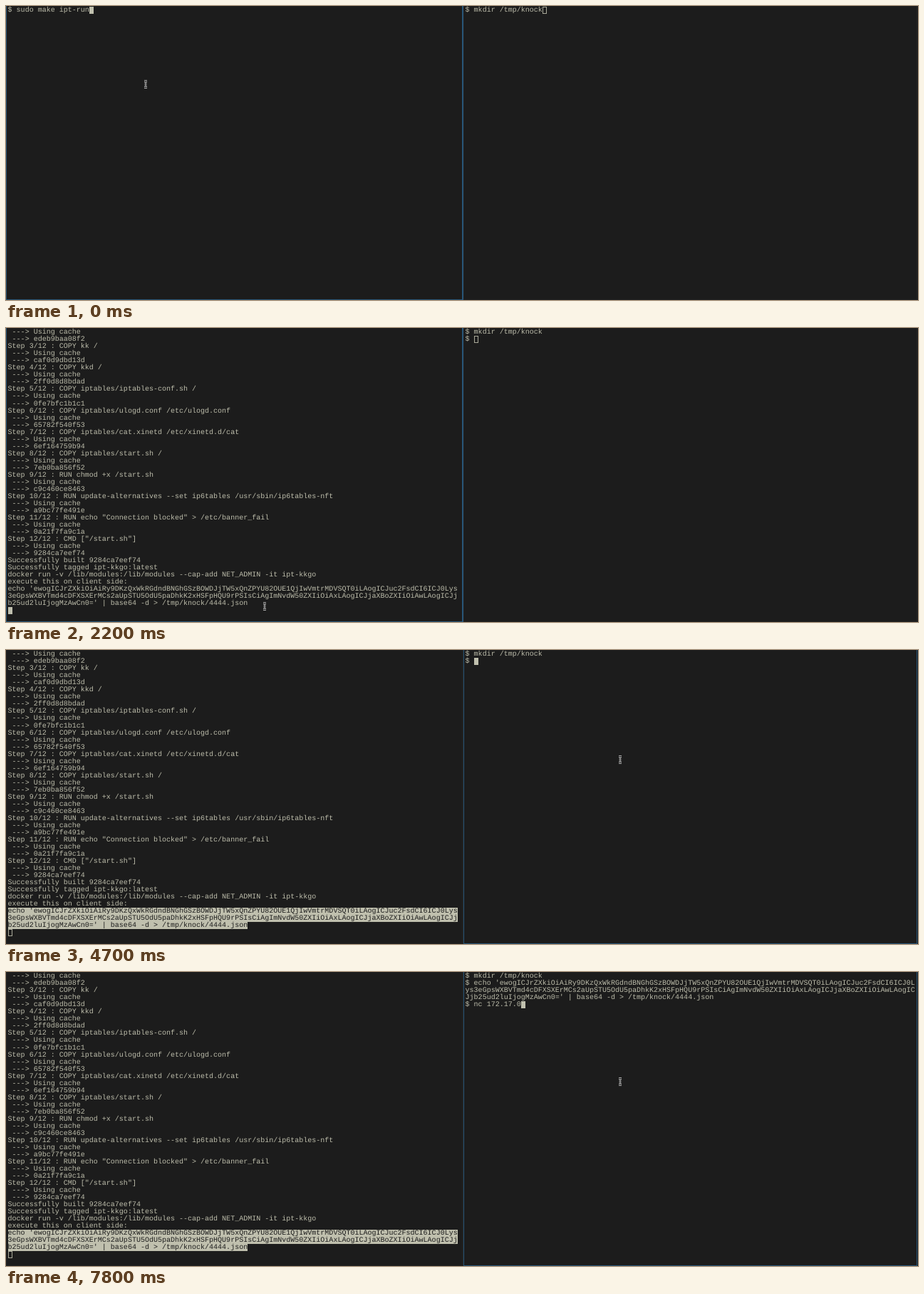
These frames come from a looping animation (1280 by 413 pixels, 8 s). An HTML page:

```html
<!DOCTYPE html>
<html lang="en">
<head>
<meta charset="utf-8">
<title>Two terminals</title>
<style>
  html, body { margin: 0; width: 100%; height: 100%; overflow: hidden; background: #1c1c1c; }
  .pane {
    position: absolute; top: -2px; height: 415px; box-sizing: border-box;
    border: 1px solid #222;
  }
  .pane.on { border-color: #285577; }
  #a { left: 0; width: 642px; border-right-width: 2px; }
  #b { left: 642px; width: 637px; }
  pre {
    position: absolute; top: 2.2px; margin: 0; color: #bdbdab;
    font: 10.03px/10.03px "Liberation Mono", monospace;
    text-rendering: geometricPrecision; font-variant-ligatures: none;
  }
  #left { left: 2.6px; }
  #right { left: 644.6px; }
  /* cell boxes start one pixel above the text line */
  pre span {
    display: inline-block; position: relative; top: -1px;
    height: 10.03px; line-height: 12.03px; vertical-align: top;
  }
  .sel { background: #c0c0ae; color: #1c1c1c; }
  .cur { width: 6.02px; box-shadow: inset 0 0 0 1px #a9a999; }
  .cur.on { background: #c0c0ae; box-shadow: none; }
  #mouse { position: absolute; left: -6px; top: -8px; fill: none; }
</style>
</head>
<body>
<div class="pane" id="a"></div>
<div class="pane" id="b"></div>
<pre id="left"></pre>
<pre id="right"></pre>
<svg id="mouse" width="12" height="16">
  <defs><path id="beam" d="M4 3.5H8M6 3.5V12.5M4 12.5H8"/></defs>
  <use href="#beam" stroke="#ddd" stroke-width="2.4"/>
  <use href="#beam" stroke="#111" stroke-width=".9"/>
</svg>
<script>
const CELL = 6.02, ROW = 10.03, COLS = 105, LOOP = 8000;
const $ = id => document.getElementById(id);
const wrap = s => s.match(new RegExp(`.{1,${COLS}}`, 'g'));
const esc = s => s.replace(/&/g, '&amp;').replace(/</g, '&lt;');

// Docker build steps: command, layer id
const steps = [
  ['FROM ubuntu', '7e0aa2d69a15'],
  ['RUN apt-get update && apt-get install -y iptables ulogd2 xinetd lib32z1', 'edeb9baa08f2'],
  ['COPY kk /', 'caf0d9dbd13d'],
  ['COPY kkd /', '2ff0d8d8bdad'],
  ['COPY iptables/iptables-conf.sh /', '0fe7bfc1b1c1'],
  ['COPY iptables/ulogd.conf /etc/ulogd.conf', '65782f540f53'],
  ['COPY iptables/cat.xinetd /etc/xinetd.d/cat', '6ef164759b94'],
  ['COPY iptables/start.sh /', '7eb0ba856f52'],
  ['RUN chmod +x /start.sh', 'c9c460ce8463'],
  ['RUN update-alternatives --set ip6tables /usr/sbin/ip6tables-nft', 'a9bc77fe491e'],
  ['RUN echo "Connection blocked" > /etc/banner_fail', '0a21f7fa9c1a'],
  ['CMD ["/start.sh"]', '9284ca7eef74'],
];
const build = [
  'Sending build context to Docker daemon  9.506MB',
  ...steps.flatMap(([cmd, id], i) => [
    `Step ${i + 1}/12 : ${cmd}`,
    ...(i ? [' ---> Using cache'] : []),
    ` ---> ${id}`,
  ]),
  'Successfully built 9284ca7eef74',
  'Successfully tagged ipt-kkgo:latest',
  'docker run -v /lib/modules:/lib/modules --cap-add NET_ADMIN -it ipt-kkgo',
];
const echo = "echo 'ewogICJrZXkiOiAiRy9DKzQxWkRGdndBNGhGSzBOWDJjTW5xQnZPYU82OUE1QjIwVmtrMDVSQT0iLAogICJuc2FsdCI6ICJ0Lys" +
  '3eGpsWXBVTmd4cDFXSXErMCs2aUpSTU5OdU5paDhkK2xHSFpHQU9rPSIsCiAgImNvdW50ZXIiOiAxLAogICJjaXBoZXIiOiAwLAogICJj' +
  "b25ud2luIjogMzAwCn0=' | base64 -d > /tmp/knock/4444.json";
const served = [...build.slice(4), 'execute this on client side:', ...wrap(echo), ''];

// Pointer: time, x, y
const path = [
  [0, 196, 110], [900, 420, 125], [1000, 650, 140], [1100, 760, 150],
  [2100, 560, 270], [2200, 363, 391], [2300, 363, 388], [2600, 342, 386],
  [2900, 310, 385], [3100, 200, 374], [3500, 54, 370], [3600, 30, 368],
  [3700, 12, 368], [3800, 3, 368], [4100, 3, 367], [4200, 3, 365],
  [4300, 4, 364], [4500, 761, 168], [4700, 862, 154],
];
// Times at which the keys of the last command arrive
const typed = 'nc 172.17.0';
const keys = [6500, 6500, 6700, 6800, 6900, 7000, 7200, 7300, 7500, 7700, 7800];

function leftLines(t) {
  const first = '$ sudo make ipt-run';
  if (t < 500) return [first];
  if (t < 600) return [first, ''];
  return t < 1400 ? [...build, ''] : served;
}

function rightLines(t) {
  const lines = ['$ mkdir /tmp/knock'];
  if (t >= 1600) lines.push(...wrap('$ ' + (t >= 5100 ? echo : '')));
  if (t >= 5500) lines.push('$ ' + typed.slice(0, keys.filter(k => k <= t).length));
  return lines;
}

// Selection runs from the pointer to the end of the echoed command
function selectFrom(t, x, y) {
  if (t < 2900) return null;
  if (t >= 4500) return [36, 0];
  return [Math.floor((y - 1.2) / ROW), Math.round((x - 2.6) / CELL)];
}

function show(id, lines, focus, sel) {
  const html = lines.map((s, i) => {
    if (!sel || i < sel[0] || !s) return esc(s);
    const c = i === sel[0] ? sel[1] : 0;
    return esc(s.slice(0, c)) + `<span class="sel">${esc(s.slice(c))}</span>`;
  }).join('\n') + `<span class="cur${focus ? ' on' : ''}"></span>`;
  const el = $(id);
  if (el.last !== html) el.innerHTML = el.last = html;
}

function draw() {
  const t = performance.now() % LOOP;
  const [, x, y] = path.filter(p => p[0] <= t).pop();
  const onRight = x > 642;
  $('a').classList.toggle('on', !onRight);
  $('b').classList.toggle('on', onRight);
  show('left', leftLines(t), !onRight, selectFrom(t, x, y));
  show('right', rightLines(t), onRight);
  $('mouse').style.transform = `translate(${x}px, ${y}px)`;
  requestAnimationFrame(draw);
}
draw();
</script>
</body>
</html>
```
